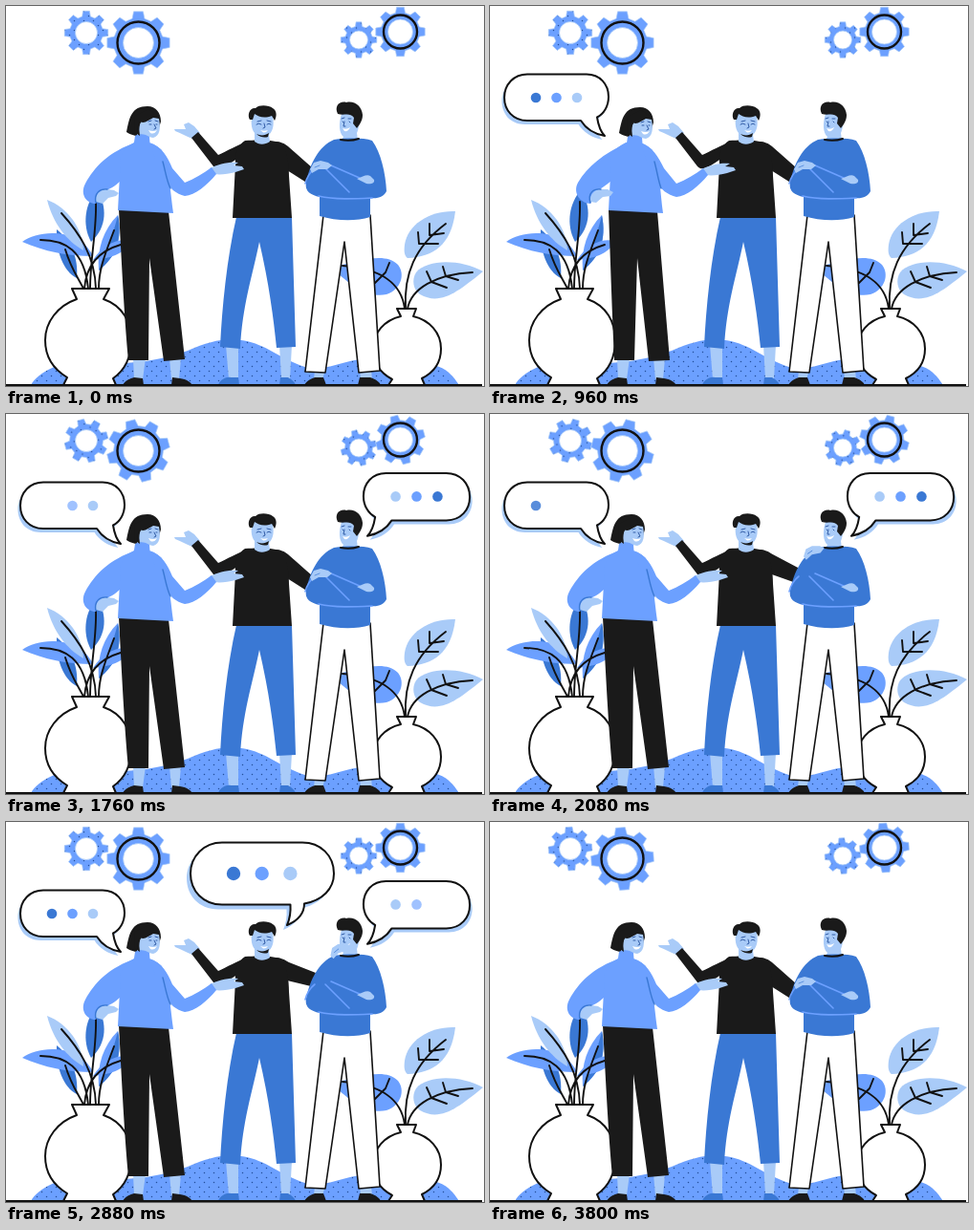
An HTML page for the animation above (3840 ms loop, 500 by 398 pixels).

```html
<!DOCTYPE html>
<html lang="en">
<head>
<meta charset="utf-8">
<title>Team talk</title>
<style>
html, body { margin: 0; width: 100%; height: 100%; overflow: hidden; background: #fff; }
svg { display: block; width: 500px; height: 398px; }
.b { fill: #6ca0ff; }
.d { fill: #3a78d4; }
.p { fill: #a9cbf8; }
.k { fill: #1a1a1a; }
.w { fill: #fff; stroke: #111; stroke-width: 2; stroke-linejoin: round; }
.ln { fill: none; stroke: #111; stroke-width: 1.9; stroke-linecap: round; stroke-linejoin: round; }
.hi { fill: none; stroke: #6ca0ff; stroke-width: 1.6; stroke-linecap: round; }
.lo { fill: none; stroke: #3a78d4; stroke-width: 1.4; stroke-linecap: round; }
.f { fill: none; stroke: #234f9b; stroke-width: .9; stroke-linecap: round; }
</style>
</head>
<body>
<svg viewBox="0 0 500 398">
  <defs>
    <pattern id="dots" width="10" height="10" patternUnits="userSpaceOnUse">
      <rect width="10" height="10" class="b"/>
      <circle cx="2.5" cy="2.5" r=".75" fill="#234f9b"/><circle cx="7.5" cy="7.5" r=".75" fill="#234f9b"/>
    </pattern>
    <path id="side" d="M39 71.5H101C115 71.5 124 82 124 95C124 105 119 113 112 116.5C113 123 115 131 120 136C109 134 100 128 95 120H39C24 120 15 109 15 96C15 82 25 71.5 39 71.5Z"/>
    <path id="mid" d="M226 21.5H310C329 21.5 343 35 343 54C343 70 331 82 312 85.5C312 95 306 103 294 108C297 101 298 94 297.5 86.5H226C206 86.5 193 72 193 54C193 36 207 21.5 226 21.5Z"/>
  </defs>

  <g id="gears"></g>

  <path fill="url(#dots)" d="M26 397C34 383 58 371 86 372C130 378 165 370 190 361C215 350 232 347 252 351C277 357 288 371 319 380C343 380 356 369 386 369C410 371 430 376 447 376C461 379 468 388 474 397Z"/>

  <!-- left plant -->
  <path class="d" d="M53 234C68 246 76 264 74 285C60 278 52 257 53 234Z"/>
  <path class="b" d="M17 247C34 234 77 232 91 262C64 262 40 257 17 247Z"/>
  <path class="p" d="M43 203C64 211 80 232 81 256C63 246 49 227 43 203Z"/>
  <path class="d" d="M95 193C106 209 106 232 89 247C79 229 83 206 95 193Z"/>
  <path class="b" d="M117 219C122 244 115 263 97 277C95 254 102 234 117 219Z"/>
  <path class="d" d="M117 219C122 244 115 263 97 277C105 258 112 240 117 219Z"/>
  <path class="b" d="M91 266C101 250 117 243 130 246C126 258 112 264 91 266Z"/>
  <path class="ln" d="M36 245C62 245 82 256 86 296M58 217C77 238 93 262 94 296M94 205C95 236 88 264 88 296M113 235C104 259 97 275 97 296M62 255C68 275 75 284 81 296M120 250C99 256 84 270 82 296"/>
  <path class="w" d="M69 296H108L102 307C122 314 131 331 131 350C131 370 122 383 112 390L115 397H60L64 389C49 380 41 368 41 350C41 331 54 314 74 307Z"/>

  <!-- right plant -->
  <path class="b" d="M340 274C370 267 396 257 410 271C418 281 413 297 398 302C380 306 362 294 340 274Z"/>
  <path class="p" d="M470 215C443 214 420 229 417 250C416 258 417 262 420 264C447 263 466 250 470 215Z"/>
  <path class="p" d="M499 278C475 265 441 265 429 279C424 287 426 297 433 302C454 314 472 300 499 278Z"/>
  <path class="ln" d="M418 317C416 281 427 253 460 228M432 249L431 237M432 249L452 249M443 240L443 228M443 240L458 238M420 317C424 296 449 281 488 279M445 289L440 278M445 289L461 295M460 283L457 273M460 283L473 287M417 317C414 292 394 275 352 272M397 279L401 269M397 279L386 290"/>
  <path class="w" d="M409 317H429L426 325C443 329 455 342 455 359C455 374 447 384 435 390L438 397H400L404 391C391 384 384 373 384 359C384 342 396 329 413 325Z"/>

  <!-- man in black -->
  <path class="p" d="M230 355H243V391H233ZM286 355H299L297 391H288Z"/>
  <path class="d" d="M222 397C224 391 231 388 235 389H243L244 397ZM286 397L287 389H295C299 391 302 394 303 397Z"/>
  <path class="d" d="M241 221L299 221L303 357L283 358C280 328 275 290 265 247C258 282 247 314 245 359L224 357C226 316 231 264 241 221Z"/>
  <path class="p" id="manHand"/>
  <path class="k" id="manArm"/>
  <path class="k" id="manSleeve"/>
  <path class="k" d="M250 141C262 140 278 140 287 143C294 150 296 165 296 178L299 222H237L240 165C239 155 243 145 250 141Z"/>
  <path class="p" d="M258 112H278C281 122 280 130 275 135L276 142C270 146 264 145 260 142L260 133C256 128 256 120 258 112Z"/>
  <path class="k" d="M255 119C252 114 255 106 261 107C265 103 275 104 279 107C284 110 283 116 281 120L278 115C270 118 264 116 260 113L258 119ZM262 134C266 136 271 136 275 133L274 137C271 138 266 138 262 134Z"/>
  <path class="f" d="M263 121L267 120M273 120L277 121M262 124Q264 122 267 124M273 124Q275 122 277 124M270 123L271 127L269 128"/>
  <path d="M266 130Q270 131.500 274 130Q272 133 269 132.500Z" fill="#fff"/>

  <!-- man with folded arms -->
  <path class="p" d="M323 381H334L331 391H322ZM370 381H382L383 391H371Z"/>
  <path class="k" d="M312 397C315 392 320 390 323 389H332L335 397ZM368 397L370 389H381C387 391 391 394 392 397Z"/>
  <path class="w" style="stroke-width:1.6" d="M332 219L313 383L334 384L354 247L369 384L391 382L381 219Z"/>
  <path class="p" d="M351 113L369 111C371 122 368 131 367 133L368 140C362 144 355 143 351 140L353 137C348 133 348 122 351 113Z"/>
  <path class="k" d="M347 113C343 105 349 99 356 101C365 99 372 105 373 114C373 120 370 124 367 128L363 123L364 117C360 111 354 115 347 113Z"/>
  <path class="f" d="M351 118L354 117M358 118L361 118M352 121L353 122M359 121L360 122M354 121L353 126L355 126"/>
  <path d="M352 128Q356 130 360 127Q358 132 354 131Z" fill="#fff"/>
  <path class="d" d="M343 140C358 138 374 138 383 141C392 153 397 175 398 194C395 200 389 202 381 201L381 221C365 226 345 225 328 220L328 200C319 198 312 194 314 185C318 165 327 147 343 140Z"/>
  <path class="ln" d="M350 140Q360 142 369 139"/>
  <path class="hi" d="M327 199C344 203 364 202 383 201M334 170L359 195M340 167L372 181M313 186C314 180 319 173 323 170"/>
  <path class="p" d="M367 181C373 179 377 176 381 178L385 182C386 186 381 187 377 186Z"/>
  <g id="chin"><path class="p" d="M318 171L322 164L329 162L337 164L341 167L336 171L327 171L320 175Z"/><path class="lo" style="stroke-width:.7" d="M323 169L328 167"/></g>

  <!-- woman -->
  <path class="p" d="M133 369H146L143 391H134ZM171 369H183L181 391H173Z"/>
  <path class="k" d="M122 397C125 392 130 390 134 389L143 390L144 397ZM173 397L174 389L182 390C189 391 193 394 195 397Z"/>
  <path class="k" id="legs"/>
  <path class="b" id="sleeveL"/>
  <path class="b" id="torso"/>
  <path class="p" id="handL"/>
  <path class="lo" id="cuffL"/>
  <path class="p" id="handR"/>
  <path class="b" id="sleeveR"/>
  <path class="lo" id="fold"/>
  <g id="head">
    <path class="k" d="M126 132C129 117 131 105 148 105C157 105 162 112 162 121L158 134L146 137C138 136 131 136 126 132Z"/>
    <path class="p" d="M141 121C144 124 150 119 154 117L160 118C162 128 161 136 154 138L149 137V142H137V134C140 131 139 126 141 121Z"/>
    <path class="b" d="M135 136C140 133 146 134 150 137L151 149H133Z"/>
    <path class="k" d="M139 126C141 117 152 121 155 112L149 108L135 115L134 132L140 136Z"/>
    <path class="f" d="M149 121L152 120M156 120L159 121M150 124L152 124M157 124L158 124M155 124L157 128L155 129"/>
    <path d="M149 130Q154 132 158 130Q155 135 151 133Z" fill="#fff"/>
  </g>

  <g id="bubbles"></g>
  <path d="M0 397H498" stroke="#111" stroke-width="2"/>
</svg>
<script>
const LOOP = 3840, STEP = 40;
const $ = id => document.getElementById(id);

const ramp = (t, a, b) => {
  const x = Math.min(1, Math.max(0, (t - a) / (b - a)));
  return x * x * (3 - 2 * x);
};
const pulse = (t, a, b, c, d) => ramp(t, a, b) - ramp(t, c, d);

// Gears: x, y, tip radius, root radius, hole radius, ring radius
const gears = [
  [84, 28, 23, 17.5, 11.5, 0],
  [138.5, 38.5, 33, 26, 16, 22],
  [369, 35.5, 19, 14.5, 9.5, 0],
  [412.5, 27, 26, 20.5, 13, 17.5]
];

function gearPath(tip, root) {
  const pts = [];
  for (let i = 0; i < 8; i++)
    for (const [r, off] of [[root, -.25], [tip, -.15], [tip, .15], [root, .25]]) {
      const a = i * Math.PI / 4 + off;
      pts.push((r * Math.sin(a)).toFixed(2) + ' ' + (-r * Math.cos(a)).toFixed(2));
    }
  return 'M' + pts.join('L') + 'Z';
}

$('gears').innerHTML = gears.map(([x, y, tip, root, hole, ring]) => `
  <g transform="translate(${x} ${y})">
    <path d="${gearPath(tip, root)}" fill="${ring ? '#6ca0ff' : 'url(#dots)'}" stroke="#a9cbf8" stroke-width=".7"/>
    ${ring ? `<circle r="${ring}" fill="none" stroke="#111" stroke-width="2.4"/>` : ''}
    <circle r="${hole}" fill="#fff" stroke="#a9cbf8" stroke-width=".8"/>
  </g>`).join('');
const wheels = [...$('gears').querySelectorAll('path')];

// Bubbles: shape, start, placement, tail tip, dots (x, y, gap, radius), shadow shift
const bubbles = [
  ['side', 0, '', [120, 136], [48, 96, 21.5, 5.3], [-2.5, 4]],
  ['side', 1120, 'translate(500.4 -11) scale(-1.02 1.02)', [120, 136], [48, 95.5, 21.5, 5.2], [-2.5, 4]],
  ['mid', 2240, '', [295, 108], [238, 54, 29.7, 7.2], [-4, 5]]
];
const tones = ['#3a78d4', '#6ca0ff', '#a9cbf8'];

$('bubbles').innerHTML = bubbles.map(([shape, , place, , [x, y, gap, r]]) => `
  <g transform="${place}"><g>
    <use href="#${shape}" class="p"/>
    <use href="#${shape}" class="w"/>
    ${tones.map((c, i) => `<circle cx="${x + i * gap}" cy="${y}" r="${r}" fill="${c}"/>`).join('')}
  </g></g>`).join('');
const clouds = [...$('bubbles').children].map(g => g.firstElementChild);

// Poses: rest, then the pose for each move (0 = unaffected): gesture, lean, think
const poses = {
  legs: [
    'M118 213L170 215L187 370L165 372L150 264L149 371L128 371C124 330 121 270 118 213Z', 0,
    'M124 213L175 215L188 371L166 372L154 264L151 371L130 371C128 330 126 270 124 213Z'],
  torso: [
    'M134 143C144 141 157 144 163 151C171 172 172 196 175 217L117 214L120 158C123 150 128 146 134 143Z', 0,
    'M142 143C152 141 164 144 170 151C178 172 178 196 181 217L124 214L127 158C130 150 136 146 142 143Z'],
  sleeveL: [
    'M136 143C108 152 92 169 83 186C77 197 84 207 94 207L100 195C108 192 114 189 120 183Z',
    'M136 143C112 152 100 169 92 185C86 197 96 207 106 208L108 195C112 191 116 188 120 183Z',
    'M144 143C118 155 102 168 92 185C86 196 95 207 105 207L110 195C116 191 121 188 127 183Z'],
  handL: [
    'M94 205C93 198 98 192 106 192L113 193L118 196L115 199L107 201L101 207Z',
    'M108 205C107 198 112 193 119 197L126 202L131 208L127 211L121 207L113 206Z',
    'M105 205C104 198 109 192 116 192L123 192L129 195L126 199L118 200L111 206Z'],
  cuffL: [
    'M94 206C92 196 98 191 106 192', 'M106 206C105 197 111 192 119 196', 'M105 206C102 196 108 191 116 192'],
  sleeveR: [
    'M150 143C163 147 169 158 174 170L187 185C197 181 207 175 215 169L220 176C210 188 198 198 187 199C178 197 171 191 167 182L156 160Z',
    'M150 143C163 147 169 155 175 165L189 173C198 168 207 160 215 153L223 158C218 170 210 182 200 188C187 188 175 181 168 176L156 160Z',
    'M157 143C170 147 176 158 182 170L195 186C205 182 215 176 223 170L228 177C218 189 206 199 195 200C186 198 178 192 174 183L163 160Z'],
  handR: [
    'M213 170C222 166 232 163 243 164L238 167L247 168L249 171L240 174C232 176 224 177 218 176Z',
    'M213 154C222 149 230 146 240 147L238 149L248 150L249 153L240 157C232 158 224 159 219 159Z',
    'M221 171C230 167 240 164 251 165L246 168L255 169L257 172L248 175C240 177 232 178 226 177Z'],
  fold: ['M164 163C167 174 168 183 172 191', 'M164 160C166 168 168 175 171 182', 'M172 163C175 174 176 183 179 191'],
  manArm: [
    'M254 141C241 146 231 152 222 156L201 132L194 138L217 168C222 173 228 170 244 158Z',
    'M254 141C241 146 232 152 224 158L198 147L192 154L216 180C221 184 228 178 244 162Z'],
  manHand: [
    'M195 139C188 136 184 134 177 131L176 129L188 129L186 124L191 122L197 126L203 133Z',
    'M193 155C187 153 182 152 173 148L173 145L184 146L182 141L185 139L192 143L199 148Z'],
  manSleeve: [
    'M280 142C288 142 291 144 295 147L321 170L316 186L294 172Z', 0, 0,
    'M280 142C288 142 291 144 296 147L324 158L319 172L294 166Z']
};
const number = /-?\d+(\.\d+)?/g;
const read = d => d.match(number).map(Number);
const rigs = Object.entries(poses).map(([id, [base, ...moves]]) => ({
  el: $(id), base, rest: read(base), moves: moves.map(d => d && read(d))
}));

function pose({ el, base, rest, moves }, weights) {
  let i = 0;
  el.setAttribute('d', base.replace(number, () => {
    const v = moves.reduce((sum, m, n) => m ? sum + weights[n] * (m[i] - rest[i]) : sum, rest[i]);
    i++;
    return v.toFixed(2);
  }));
}

// Dots leave one by one, then come back in the same order.
function dotAlpha(t, i) {
  return ramp(t, i * 100 - 60, i * 100 + 120)
    - ramp(t, 1480 + i * 200, 1680 + i * 200)
    + ramp(t, 1960 + i * 160, 2120 + i * 160);
}

function drawBubble(t, g, i) {
  const [, start, , [x, y], , [sx, sy]] = bubbles[i];
  const show = Math.max(0, ramp(t, start, start + 220) - ramp(t, 3280, 3520));
  const rest = 1 - show;
  const drop = Math.max(0, 2 * show - 1);
  const [shadow, body, ...marks] = g.children;
  g.setAttribute('transform',
    `translate(${x} ${y + 6 * rest}) rotate(${-6 * rest}) scale(${1 - .02 * rest}) translate(${-x} ${-y})`);
  g.style.visibility = show > 0 ? 'visible' : 'hidden';
  shadow.setAttribute('transform', `translate(${sx * drop} ${sy * drop})`);
  shadow.style.opacity = Math.min(1, 1.6 * show);
  body.style.opacity = show;
  marks.forEach((el, n) => { el.style.opacity = show * dotAlpha(t - start, n); });
}

function draw(time) {
  const t = Math.floor(time % LOOP / STEP) * STEP;
  wheels.forEach(el => el.setAttribute('transform', `rotate(${360 * t / LOOP})`));

  const gesture = pulse(t, 40, 440, 560, 920);
  const lean = pulse(t, 560, 920, 1040, 1520);
  const think = pulse(t, 1800, 2240, 2920, 3340);
  rigs.forEach(rig => pose(rig, [gesture, lean, think]));
  $('head').setAttribute('transform', `translate(${9 * lean} ${lean})`);
  $('chin').setAttribute('transform',
    `translate(${20 * think - 6 * Math.sin(Math.PI * think)} ${-34 * think}) rotate(${-18 * think} 328 168)`);

  clouds.forEach((g, i) => drawBubble(t, g, i));
}

const begin = performance.now();
function tick() {
  draw(performance.now() - begin);
  requestAnimationFrame(tick);
}
tick();
</script>
</body>
</html>
```
